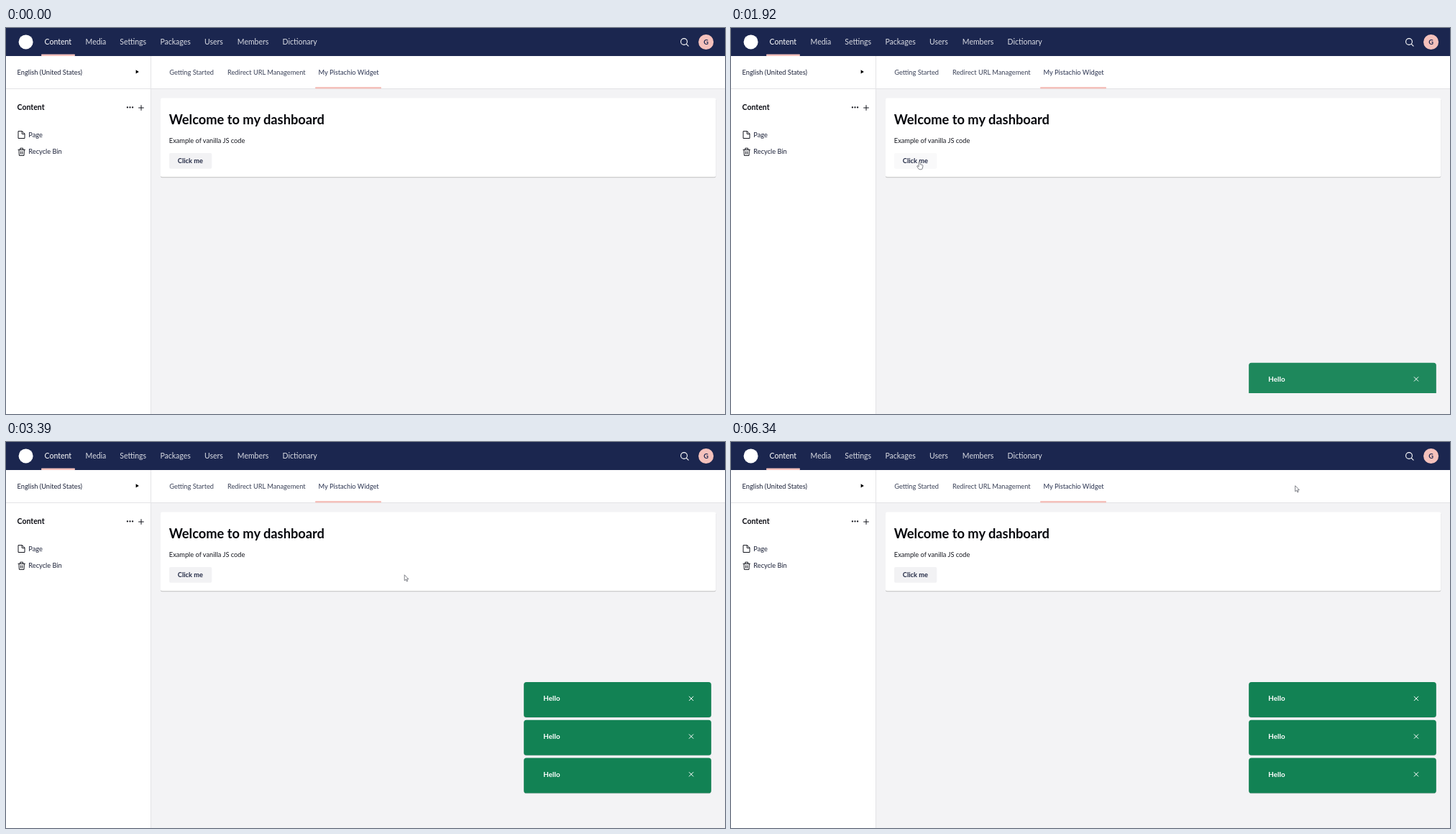
An HTML page for the animation above (6360 ms loop, 1000 px wide and 537 px high).

```html
<!DOCTYPE html>
<html lang="en">
<head>
<meta charset="utf-8">
<title>Dashboard notifications</title>
<style>
html, body { margin: 0; width: 100%; height: 100%; overflow: hidden; background: #f3f3f5; }
svg { display: block; width: 1000px; height: 537px; font-family: Lato, sans-serif; font-size: 9.24px; }
.bold { font-weight: 700; }
.nav { font-size: 10.5px; fill: #d9dbe3; }
.tabs { fill: #3b4258; }
.line { fill: none; stroke: #15171f; stroke-width: 1; stroke-linecap: round; stroke-linejoin: round; }
</style>
</head>
<body>
<svg viewBox="0 0 1000 537" xmlns="http://www.w3.org/2000/svg">
  <defs>
    <clipPath id="tray"><rect x="700" y="200" width="300" height="308"/></clipPath>
    <g id="toast">
      <rect x="720" y=".7" width="261" height="49" rx="4" opacity=".15"/>
      <rect x="720.2" width="260.6" height="49" rx="3.6" fill="#128254"/>
      <text class="bold" x="747.3" y="26" fill="#fff" style="font-size:9.9px">Hello</text>
      <path d="M950.2 20l5.6 5.6m0-5.6l-5.6 5.6" stroke="#fff" stroke-linecap="round"/>
    </g>
  </defs>

  <rect width="1000" height="537" fill="#f3f3f5"/>
  <path d="M0 39H1000V84H201V537H0z" fill="#fff"/>
  <path d="M0 84.5H1000M201.5 39V537" stroke="#e3e3e6"/>

  <rect width="1000" height="39" fill="#1b264f"/>
  <circle cx="27.6" cy="19.4" r="10" fill="#fff"/>
  <g class="nav">
    <text x="53.6" y="23.1" fill="#fff">Content</text>
    <text x="110.6" y="23.1">Media</text>
    <text x="158.3" y="23.1">Settings</text>
    <text x="214.4" y="23.1">Packages</text>
    <text x="276" y="23.1">Users</text>
    <text x="321.8" y="23.1">Members</text>
    <text x="384.6" y="23.1">Dictionary</text>
  </g>
  <rect x="49" y="36.5" width="47" height="2.5" rx="1" fill="#f5c1bc"/>
  <g fill="none" stroke="#fff" stroke-width="1.1" stroke-linecap="round">
    <circle cx="943" cy="19" r="4.4"/><path d="M946.3 22.3l2.8 2.8"/>
  </g>
  <circle cx="973.6" cy="19.5" r="10.5" fill="#f5c1bc"/>
  <text class="bold" x="973.6" y="22.8" text-anchor="middle" fill="#1b264f">G</text>

  <g class="tabs">
    <text x="227.2" y="64.7">Getting Started</text>
    <text x="308" y="64.7">Redirect URL Management</text>
    <text x="434.6" y="64.7" fill="#2a3350">My Pistachio Widget</text>
  </g>
  <rect x="430" y="82" width="92" height="2.5" rx="1" fill="#f5c1bc"/>

  <g fill="#1b2138">
    <text x="15.6" y="64.7">English (United States)</text>
    <path d="M180.6 58.3l4.2 2.6-4.2 2.6z" fill="#000"/>
    <text class="bold" x="15.6" y="114.2" fill="#0c0d14" style="font-size:10.5px">Content</text>
    <text x="31.3" y="151.7">Page</text>
    <text x="31.3" y="175.2">Recycle Bin</text>
  </g>
  <path class="line" d="M168.9 110.4h7.3" style="stroke-width:2.3;stroke-dasharray:0 3.6"/>
  <path class="line" d="M184.6 111h6.8M188 107.6v6.8"/>
  <path class="line" d="M17.4 143.6h5l3.6 3.6v6.3h-8.6zM22.2 143.8v3.6h3.6"/>
  <path class="line" d="M17 169.3h9.4M19.8 169v-1.8h3.8v1.8M18 169.6l.4 7.8h6.6l.4-7.8M20.6 171.8v3.4M22.8 171.8v3.4"/>

  <rect x="215" y="98.4" width="772.2" height="109.8" rx="2" opacity=".22"/>
  <rect x="215" y="97.5" width="772.2" height="109.8" rx="2" fill="#fff"/>
  <text class="bold" x="226.8" y="134.2" fill="#07080d" style="font-size:18.25px">Welcome to my dashboard</text>
  <text x="226.8" y="159.8" fill="#15171f">Example of vanilla JS code</text>
  <rect id="button" x="227" y="174" width="59.3" height="21.8" rx="2"/>
  <text id="label" class="bold" x="238.8" y="188.1">Click me</text>

  <g id="toasts" clip-path="url(#tray)"></g>

  <g id="cursor" fill="#fff" stroke="#4a4d57" stroke-width=".7" stroke-linejoin="round">
    <path id="arrow" d="M0 0V8L1.9 6.4 3.2 9.2 4.5 8.6 3.2 5.9H5.7Z"/>
    <path id="hand" d="M-1 .8Q0-.6 1 .8V4L4.2 4.9Q5 5.2 4.8 6.4L4.2 9.2Q4 11 2.6 11H.2Q-.8 11-1.4 9.8L-3.4 6.8Q-3.4 5.6-2.2 6L-1 7.2Z"/>
  </g>
</svg>
<script>
const LOOP = 6360;
const TOASTS = 3, FIRST_CLICK = 1663, CLICK_GAP = 441, RISE = 380;
const PITCH = 52.7, REST = 439.5;
const STEP = 94, PHASE = 68;   // the page repaints toasts in coarse steps
const GLIDE = 500;             // duration of every pointer move

const ENTRY = { x: 700, y: -14 };
const STOPS = [
  { at: 870, x: 264.3, y: 184.5 },   // button
  { at: 2200, x: 259, y: 187.5 },    // small drifts between clicks
  { at: 2690, x: 261.5, y: 182 },
  { at: 3390, x: 554.2, y: 184.8 },  // middle of the card
  { at: 4690, x: 901.3, y: 2.8 },    // header
  { at: 6330, x: 784.7, y: 60.8 }    // back from outside
];

const $ = id => document.getElementById(id);
const clamp = v => Math.max(0, Math.min(1, v));
const smooth = v => v * v * (3 - 2 * v);
const lerp = (a, b, k) => a + (b - a) * k;
const show = (id, on) => { $(id).style.display = on ? "" : "none"; };
const snap = t => Math.floor((t + 1 - PHASE) / STEP) * STEP + PHASE;

const toasts = Array.from({ length: TOASTS }, () => {
  const node = document.createElementNS("http://www.w3.org/2000/svg", "use");
  node.setAttribute("href", "#toast");
  return $("toasts").appendChild(node);
});

function pointer(t) {
  return STOPS.reduce((p, stop) => {
    const k = smooth(clamp((t - stop.at) / GLIDE + 1));
    return { x: lerp(p.x, stop.x, k), y: lerp(p.y, stop.y, k) };
  }, ENTRY);
}

function drawPointer(t) {
  const { x, y } = pointer(t);
  const over = x > 227 && x < 287 && y > 174 && y < 196;
  const away = t >= 5810 && t < 6320;
  $("cursor").setAttribute("transform", `translate(${x} ${y})`);
  show("cursor", !away);
  show("arrow", !over);
  show("hand", over);
  $("button").setAttribute("fill", over ? "#f9f9fa" : "#f2f2f4");
  $("label").setAttribute("fill", over && t < 1680 ? "#3544b1" : "#232a45");
}

// Each new toast opens a row at the bottom and lifts the earlier ones
function drawToasts(t) {
  let top = REST + PITCH;
  for (let i = TOASTS - 1; i >= 0; i--) {
    const u = clamp((t - FIRST_CLICK - i * CLICK_GAP) / RISE);
    top -= PITCH * smooth(u);
    toasts[i].setAttribute("y", top);
    toasts[i].setAttribute("opacity", clamp(u * 1.88));
  }
}

function draw(t) {
  drawPointer(t);
  drawToasts(snap(t));
}

const start = performance.now();
function tick() {
  draw((performance.now() - start) % LOOP);
  requestAnimationFrame(tick);
}
draw(0);
requestAnimationFrame(tick);
</script>
</body>
</html>
```
